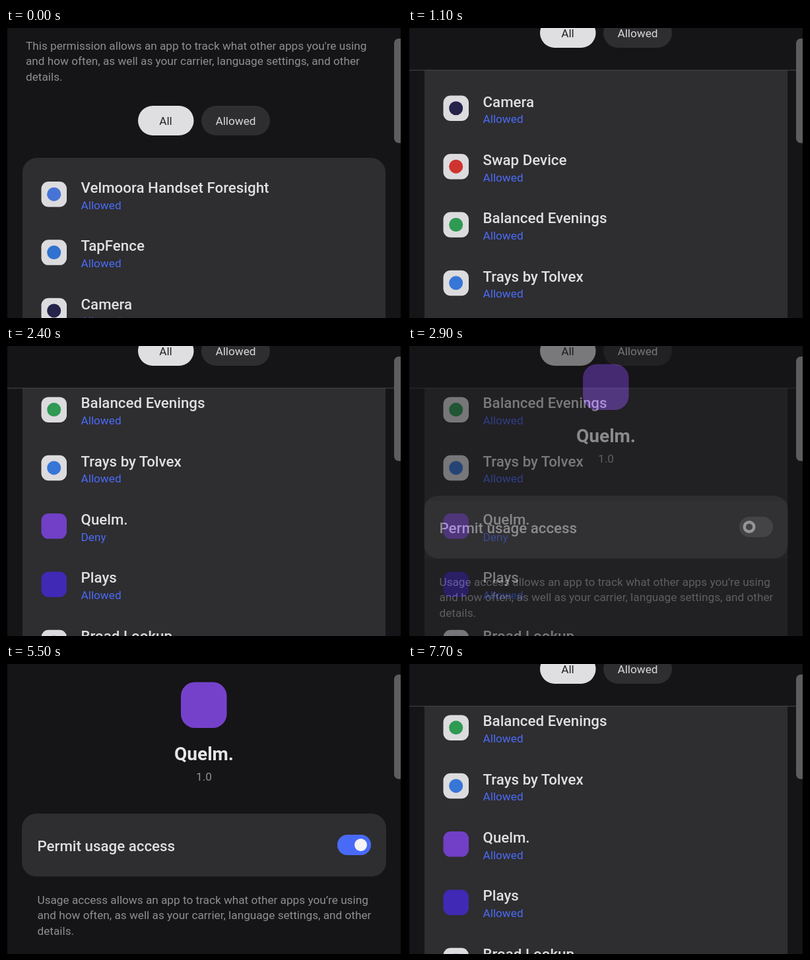
Animation of 600 by 440 pixels, one loop 7800 ms. Source, as an HTML page:

```html
<!DOCTYPE html>
<html lang="en">
<head>
<meta charset="utf-8">
<title>Usage access</title>
<style>
  html, body { margin: 0; width: 100%; height: 100%; overflow: hidden; background: #000; }
  svg { display: block; width: 600px; height: 440px; }
  text { font-family: Roboto, sans-serif; font-size: 17.2px; fill: #8f8e91; }
  .name { font-size: 22.3px; font-weight: 500; fill: #e0dfe1; }
  .state { fill: #4a6bf5; }
  .title { font-size: 28px; font-weight: 700; fill: #e6e5e7; }
  .mid { text-anchor: middle; }
  .bg { fill: #151417; }
  .card { fill: #2e2d30; }
</style>
</head>
<body>
<svg viewBox="0 0 600 440">
  <rect width="600" height="440" fill="#000"/>
  <rect class="bg" x="2" width="596" height="440"/>
  <g id="listPage">
    <g id="list">
      <rect class="card" x="25" y="197" width="550" height="1100" rx="22"/>
      <rect id="rowPress" x="25" y="744" width="550" height="88" fill="#fff" opacity="0"/>
    </g>
    <g id="header">
      <rect class="bg" x="2" y="-10" width="596" height="207"/>
      <rect x="200" y="118" width="84.5" height="45" rx="22.5" fill="#dfdee0"/>
      <rect class="card" x="296" y="118" width="104" height="45" rx="22.5"/>
      <text class="mid" x="242" y="146.5" style="fill:#242326">All</text>
      <text class="mid" x="348" y="146.5" style="fill:#d8d7d9">Allowed</text>
    </g>
    <rect id="rule" x="2" y="63.5" width="586" height="1" fill="#4b4a4d"/>
  </g>
  <g id="detailPage">
    <rect class="bg" x="2" width="596" height="440"/>
    <rect x="265" y="27.5" width="69.5" height="69.5" rx="21" fill="#7541cb"/>
    <text class="title mid" x="300" y="146">Quelm.</text>
    <text class="mid" x="300" y="177">1.0</text>
    <rect class="card" x="24" y="227" width="552" height="95.5" rx="22"/>
    <rect id="cardPress" x="24" y="227" width="552" height="95.5" rx="22" fill="#fff" opacity="0"/>
    <text class="name" x="47.5" y="283.5">Permit usage access</text>
    <rect x="502" y="259" width="51" height="31" rx="15.5" fill="#545356"/>
    <rect id="trackOn" x="502" y="259" width="51" height="31" rx="15.5" fill="#486af6"/>
    <circle id="knob" cy="274.5" r="7.3" fill="none" stroke="#f4f3f5" stroke-width="4.4"/>
    <circle id="knobFill" cy="274.5" r="6" fill="#f4f3f5"/>
  </g>
  <rect x="588" y="16" width="16" height="158.5" rx="7" fill="#5d5c5e"/>
  <rect x="598" width="2" height="440" fill="#000"/>
</svg>
<script>
const LOOP = 7800, STEP = 100, ROW = 88.35, STICK = 133;
const PALE = '#dcdbde';

// name, tile colour, mark colour
const apps = [
  ['Velmoora Handset Foresight', PALE, '#4674d6'],
  ['TapFence', PALE, '#2f72cf'],
  ['Camera', PALE, '#25234a'],
  ['Swap Device', PALE, '#cf332e'],
  ['Balanced Evenings', PALE, '#2f9a52'],
  ['Trays by Tolvex', PALE, '#3676d6'],
  ['Quelm.', '#7140c6'],
  ['Plays', '#4029b5'],
  ['Broad Lookup', PALE, '#2b86dc']
];
const TAPPED = 6;

// [time, value] pairs, eased between neighbours
const tracks = {
  scroll: [[0, 0], [700, 253], [900, 253], [1600, 526], [1700, 526], [2400, 509]],
  rowPress: [[2400, 0], [2600, .07], [2800, .07], [3000, 0]],
  detail: [[2700, 0], [3100, 1], [6400, 1], [6800, 0]],
  cardPress: [[4400, 0], [4600, .05], [4800, 0]],
  toggle: [[4600, 0], [5000, 1]]
};

const $ = id => document.getElementById(id);

function add(parent, tag, attrs, label = '') {
  const el = document.createElementNS('http://www.w3.org/2000/svg', tag);
  for (const key in attrs) el.setAttribute(key, attrs[key]);
  el.textContent = label;
  return parent.appendChild(el);
}

function paragraph(parent, x, y, lines) {
  lines.forEach((line, i) => add(parent, 'text', { x, y: y + i * 23.8 }, line));
}

const tail = ['and how often, as well as your carrier, language settings, and other', 'details.'];
paragraph($('header'), 30, 32.5, ["This permission allows an app to track what other apps you're using", ...tail]);
paragraph($('detailPage'), 47.5, 363.5, ['Usage access allows an app to track what other apps you’re using', ...tail]);

const states = apps.map(([name, tile, mark], i) => {
  const row = add($('list'), 'g', { transform: `translate(0 ${i * ROW})` });
  add(row, 'rect', { x: 53.5, y: 233, width: 38.5, height: 38.5, rx: 11, fill: tile });
  if (mark) add(row, 'circle', { cx: 72.7, cy: 252.2, r: 10.5, fill: mark });
  add(row, 'text', { x: 113.5, y: 250, class: 'name' }, name);
  return add(row, 'text', { x: 113.5, y: 274.7, class: 'state' }, 'Allowed');
});

function at(track, t) {
  const i = track.findIndex(key => key[0] > t);
  if (i === 0) return track[0][1];
  if (i < 0) return track[track.length - 1][1];
  const [t0, a] = track[i - 1], [t1, b] = track[i];
  const p = (t - t0) / (t1 - t0);
  return a + (b - a) * p * p * (3 - 2 * p);
}

const set = (id, key, value) => $(id).setAttribute(key, value);

function draw(t) {
  const scroll = at(tracks.scroll, t);
  const detail = at(tracks.detail, t);
  const on = at(tracks.toggle, t);
  set('list', 'transform', `translate(0 ${-scroll})`);
  set('header', 'transform', `translate(0 ${-Math.min(scroll, STICK)})`);
  set('rule', 'opacity', scroll > STICK ? 1 : 0);
  set('rowPress', 'opacity', at(tracks.rowPress, t));
  set('detailPage', 'opacity', detail);
  set('cardPress', 'opacity', at(tracks.cardPress, t));
  set('trackOn', 'opacity', on);
  set('knob', 'cx', 517 + 20.5 * on);
  set('knobFill', 'cx', 517 + 20.5 * on);
  set('knobFill', 'opacity', on);
  states[TAPPED].textContent = on < 1 ? 'Deny' : 'Allowed';
}

const start = performance.now();
function tick() {
  const t = (performance.now() - start) % LOOP;
  draw(Math.floor(t / STEP) * STEP);
  requestAnimationFrame(tick);
}
tick();
</script>
</body>
</html>
```
